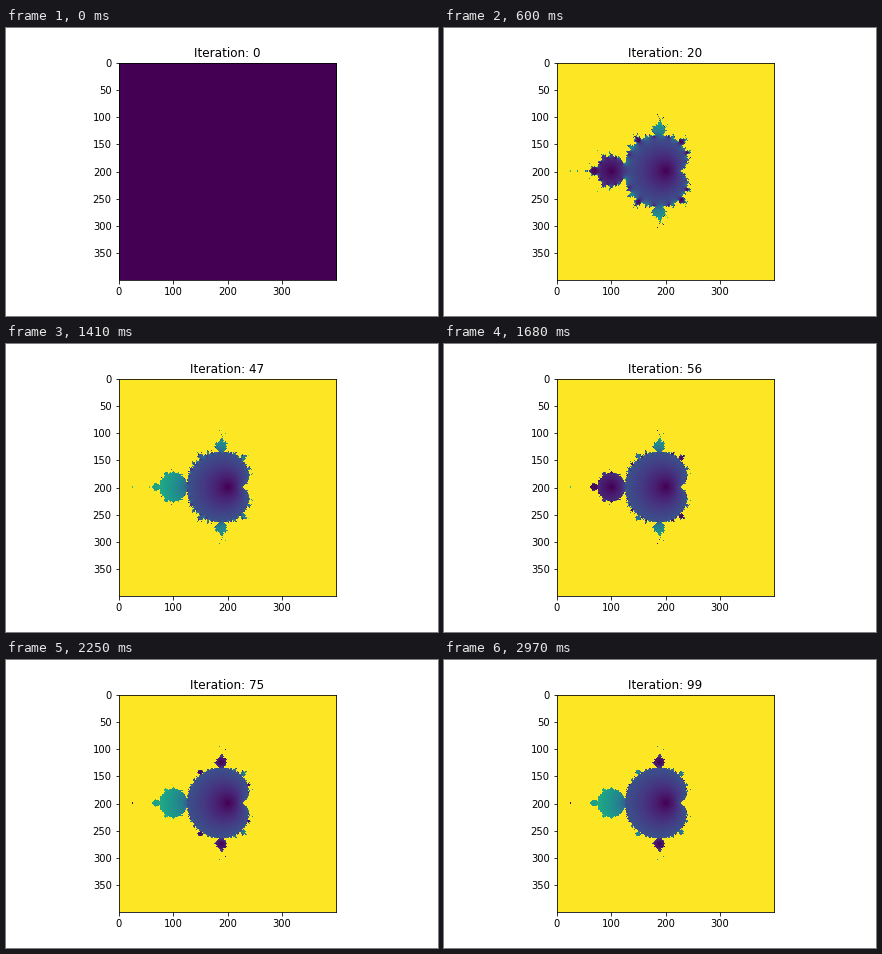
Recreate the animation shown at these times as a matplotlib script. Size 432 by 288 pixels, loop 3000 ms.

```python
import numpy as np
import matplotlib.pyplot as plt
from matplotlib.animation import FuncAnimation

SIZE = 400
FRAMES = 100
INTERVAL = 30
BOUND = 2


def orbit_sizes(steps):
    """Return |z| after each step of z -> z^2 + c, held once it escapes."""
    axis = np.linspace(-BOUND, BOUND, SIZE)
    c = axis[None, :] + 1j * axis[:, None]
    z = np.zeros_like(c)
    sizes = np.empty((steps, SIZE, SIZE), dtype=np.float32)
    for n in range(steps):
        sizes[n] = np.minimum(np.abs(z), BOUND)
        alive = np.abs(z) <= BOUND
        z[alive] = z[alive] ** 2 + c[alive]
    return sizes


sizes = orbit_sizes(FRAMES)

plt.rcParams["font.family"] = "DejaVu Sans"
fig = plt.figure(figsize=(6, 4), dpi=72, facecolor="white")
fig.subplots_adjust(left=0.125, right=0.9, bottom=0.125, top=0.88)
ax = fig.add_subplot()
image = ax.imshow(sizes[0], cmap="viridis", vmin=0, vmax=BOUND,
                  interpolation="nearest")
title = ax.set_title("Iteration: 0", fontsize=12)


def update(n):
    image.set_data(sizes[n])
    title.set_text(f"Iteration: {n}")
    return image, title


anim = FuncAnimation(fig, update, frames=FRAMES, interval=INTERVAL,
                     repeat=True, repeat_delay=0, blit=False)
plt.show()
```
